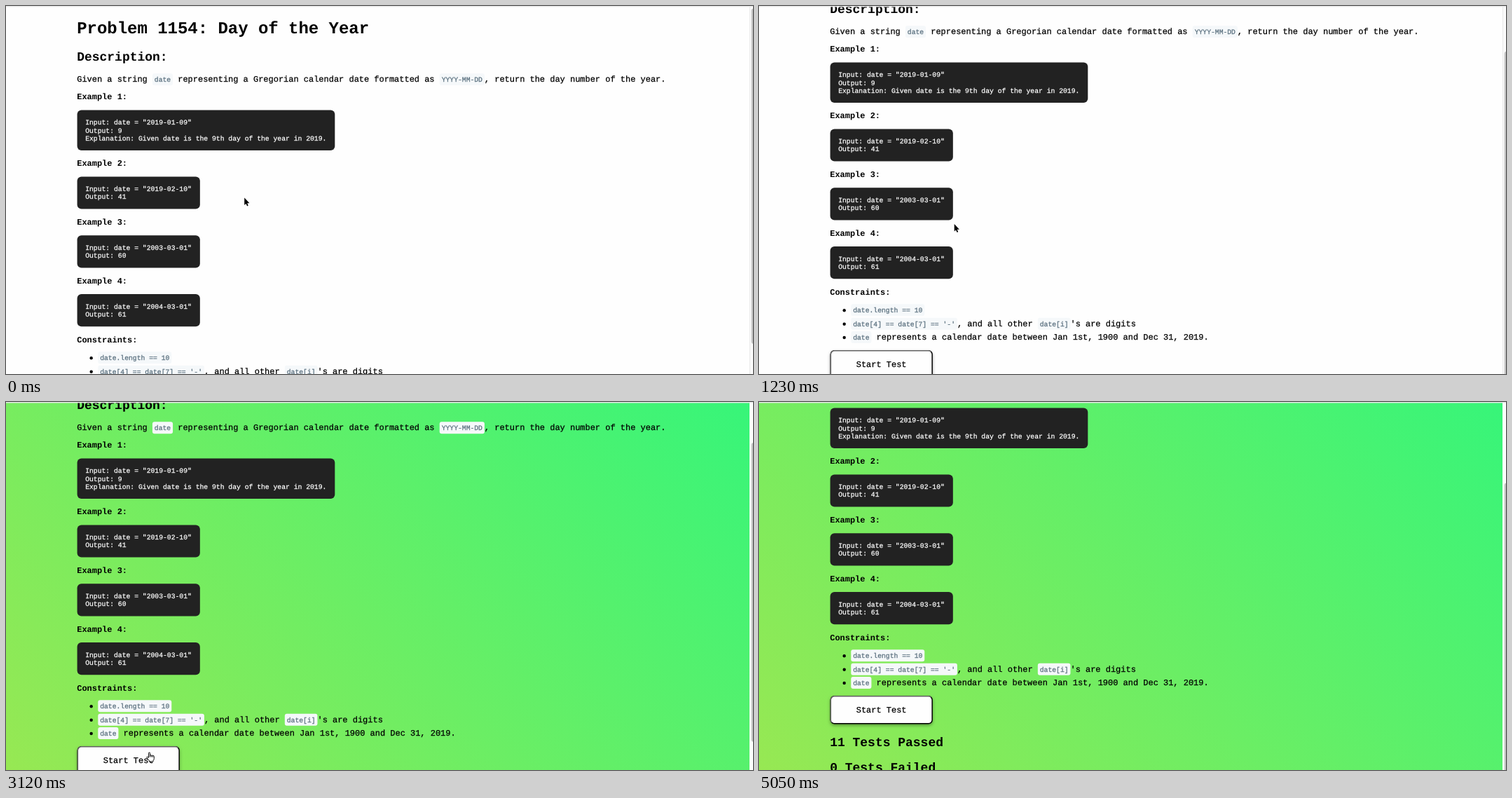
Write an HTML page with a canvas that moves like this. It is 1066 px wide and 525 px high and loops after 5.15 s.

```html
<!DOCTYPE html>
<html lang="en">
<head>
<meta charset="utf-8">
<title>Day of the Year</title>
<style>
  html, body { margin: 0; width: 100%; height: 100%; overflow: hidden; background: #fefefe; }
  canvas { display: block; }
</style>
</head>
<body>
<canvas id="stage" width="1066" height="525"></canvas>
<script>
const ctx = document.getElementById('stage').getContext('2d');
const W = 1066, H = 525, LOOP = 5150;
const LEFT = 101.2, BOX_LEFT = 101.6, PAGE_RIGHT = 1061, PASS_AT = 3120;
const ZOOM = 0.7488;
const BODY = 16 * ZOOM, CODE = 13 * ZOOM, H1 = 32 * ZOOM, H2 = 24 * ZOOM, PAD = 2.9;
const MONO = '"Liberation Mono", "Courier New", monospace';

// Held steps: [time, scroll offset]
const SCROLL = [
  [0, 0], [600, 8], [720, 19], [870, 28], [990, 39], [1110, 57], [1230, 68],
  [3210, 69], [3300, 72], [3420, 79], [3540, 86.8], [3630, 118], [3750, 140]
];

// Held steps: [time, shape, x, y]
const POINTER = [
  [0, 'arrow', 340.2, 273.5], [180, 'arrow', 279, 311.5], [330, 'arrow', 278.7, 311],
  [1740, 'arrow', 279, 352], [1840, 'arrow', 281, 445], [1950, 'beam', 286, 447],
  [2130, 'beam', 263, 449.5], [2220, 'beam', 259, 455], [2310, 'beam', 249, 465],
  [2390, 'arrow', 234, 477], [2480, 'hand', 219, 487], [2570, 'hand', 207, 494],
  [2660, 'hand', 203, 497], [2750, 'hand', 201, 499], [2840, 'hand', 200.5, 500],
  [3210, 'hand', 202, 499], [3300, 'hand', 207, 495], [3420, 'hand', 216, 489],
  [3540, 'hand', 222.8, 485], [4230, 'arrow', 345, 502], [4320, 'arrow', 490, 507],
  [4410, 'arrow', 690, 511], [4500, 'arrow', 900, 514], [4600, 'arrow', 1053, 517],
  [4690, 'arrow', 1029, 516], [4870, 'arrow', 1010, 516], [4960, 'arrow', 992, 519],
  [5050, 'none', 0, 0]
];

const SHAPES = {
  arrow: new Path2D('M0 0V10.6L2.3 8.4 3.9 12 5.5 11.3 4 7.8H7.2Z'),
  beam: new Path2D('M-3-6.3Q0-6.3 0-4.8V4.8Q0 6.3-3 6.3M3-6.3Q0-6.3 0-4.8M0 4.8Q0 6.3 3 6.3M-1.5 2.2H1.5'),
  hand: new Path2D('M3 7.5V1.2q0-1.2 1-1.2t1 1.2V4.6q.2-.9 1-.9t1 1.1q.2-.8 1-.8t1 1.1' +
    'q.2-.7.9-.7t.9 1.1V8.5q0 2-1.3 3.2V13H4V11.8Q2.2 10 .8 7.8 0 6.4 1 6.1 2 6 3 7.5Z')
};

const EXAMPLES = [
  { y: 148.5, lines: ['Input: date = "2019-01-09"', 'Output: 9',
    'Explanation: Given date is the 9th day of the year in 2019.'] },
  { y: 243.4, lines: ['Input: date = "2019-02-10"', 'Output: 41'] },
  { y: 327.2, lines: ['Input: date = "2003-03-01"', 'Output: 60'] },
  { y: 411, lines: ['Input: date = "2004-03-01"', 'Output: 61'] }
];

function held(steps, t) {
  let current = steps[0];
  for (const step of steps) if (step[0] <= t) current = step;
  return current;
}

function textWidth(str, size) {
  ctx.font = `${size}px ${MONO}`;
  return ctx.measureText(str).width;
}

function text(str, x, y, size = BODY, color = '#000', bold = false) {
  ctx.font = `${bold ? 'bold ' : ''}${size}px ${MONO}`;
  ctx.fillStyle = ctx.strokeStyle = color;
  ctx.fillText(str, x, y);
  if (!bold) {
    ctx.lineWidth = 0.25;
    ctx.strokeText(str, x, y);
  }
  return x + ctx.measureText(str).width;
}

const heading = (str, y, size = BODY) => text(str, LEFT, y, size, '#000', true);

function box(x, y, w, h, r, color) {
  ctx.beginPath();
  ctx.roundRect(x, y, w, h, r);
  ctx.fillStyle = color;
  ctx.fill();
}

// Mixed line: parts in backticks become code chips
function rich(str, x, y) {
  str.split('`').forEach((part, i) => {
    if (!part) return;
    if (i % 2 === 0) {
      x = text(part, x, y);
      return;
    }
    const w = textWidth(part, CODE) + PAD * 2;
    box(x, y - 12, w, 17, 3, '#f5f8fa');
    text(part, x + PAD, y, CODE, '#586e7d');
    x += w;
  });
}

function bullet(str, y) {
  ctx.beginPath();
  ctx.arc(121.7, y - 3, 2.2, 0, Math.PI * 2);
  ctx.fillStyle = '#000';
  ctx.fill();
  rich(str, 131.3, y);
}

function example({ y, lines }, i) {
  heading(`Example ${i + 1}:`, y - 15.2);
  const w = Math.max(...lines.map(s => textWidth(s, CODE))) + 23.6;
  box(BOX_LEFT, y, w, lines.length * 11.2 + 23.8, 6, '#222');
  lines.forEach((s, n) => text(s, LEFT + 12, y + 20.8 + n * 11.2, CODE, '#fff'));
}

function button(x, y, w, h) {
  ctx.save();
  ctx.shadowColor = 'rgba(0,0,0,.35)';
  ctx.shadowBlur = 4;
  ctx.shadowOffsetY = 2;
  box(x, y, w, h, 6, '#000');
  ctx.restore();
  // Outset border: lighter on the top and left
  ctx.save();
  ctx.beginPath();
  ctx.moveTo(x, y + h);
  ctx.lineTo(x, y);
  ctx.lineTo(x + w, y);
  ctx.lineTo(x + w - 6, y + 6);
  ctx.lineTo(x + 6, y + h - 6);
  ctx.clip();
  box(x, y, w, h, 6, '#626262');
  ctx.restore();
  box(x + 1.5, y + 1.5, w - 3, h - 3, 4.5, '#fefefe');
  text('Start Test', x + 37.1, y + 24);
}

function background(passed) {
  ctx.fillStyle = '#fefefe';
  ctx.fillRect(0, 0, W, H);
  if (!passed) return;
  const cx = PAGE_RIGHT / 2, cy = H / 2, d = (PAGE_RIGHT + H) / 4;
  const g = ctx.createLinearGradient(cx - d, cy + d, cx + d, cy - d);
  g.addColorStop(0, '#97e853');
  g.addColorStop(1, '#37f579');
  ctx.fillStyle = g;
  ctx.fillRect(0, 0, PAGE_RIGHT, H);
}

function page(passed) {
  heading('Problem 1154: Day of the Year', 39, H1);
  heading('Description:', 78, H2);
  rich('Given a string `date` representing a Gregorian calendar date formatted as ' +
    '`YYYY-MM-DD`, return the day number of the year.', LEFT, 108.2);
  EXAMPLES.forEach(example);
  heading('Constraints:', 479.6);
  bullet('`date.length == 10`', 505.3);
  bullet("`date[4] == date[7] == '-'`, and all other `date[i]`'s are digits", 524.7);
  bullet('`date` represents a calendar date between Jan 1st, 1900 and Dec 31, 2019.', 544);
  button(BOX_LEFT, 559.1, 146.3, 40.4);
  if (passed) {
    heading('11 Tests Passed', 631, H2);
    heading('0 Tests Failed', 667, H2);
  }
}

function frameEdges(scroll, passed) {
  ctx.fillStyle = passed ? '#fefefe' : '#fbfbfb';
  ctx.fillRect(PAGE_RIGHT, 0, W - PAGE_RIGHT, H);
  ctx.fillStyle = '#e8e8e8';
  if (!passed) ctx.fillRect(PAGE_RIGHT, 0, 1, H);
  ctx.fillRect(0, 0, W, 1.4);
  const top = 3.5 + scroll * (passed ? 0.8 : 0.9);
  box(1063.7, top, 6, passed ? 427 : 478.5, 3, '#c1c1c1');
}

function pointer([, shape, x, y]) {
  if (shape === 'none') return;
  const path = SHAPES[shape];
  ctx.save();
  ctx.translate(x, y);
  ctx.lineJoin = 'round';
  if (shape === 'hand') {
    ctx.fillStyle = '#fff';
    ctx.fill(path);
    ctx.strokeStyle = '#000';
    ctx.lineWidth = 1;
    ctx.stroke(path);
    ctx.stroke(new Path2D('M5 4.6V6.5M7 4.8V6.6M9 5.1V6.7'));
  } else {
    ctx.strokeStyle = '#fff';
    ctx.lineWidth = shape === 'beam' ? 2.4 : 1.5;
    ctx.stroke(path);
    ctx.strokeStyle = ctx.fillStyle = '#000';
    ctx.lineWidth = 1;
    if (shape === 'beam') ctx.stroke(path);
    else ctx.fill(path);
  }
  ctx.restore();
}

function draw(now) {
  const t = now % LOOP;
  const scroll = held(SCROLL, t)[1];
  const passed = t >= PASS_AT;
  ctx.textRendering = 'geometricPrecision';
  background(passed);
  ctx.save();
  ctx.translate(0, -scroll);
  page(passed);
  ctx.restore();
  frameEdges(scroll, passed);
  pointer(held(POINTER, t));
}

let start;
function tick(now) {
  start ??= now;
  draw(now - start);
  requestAnimationFrame(tick);
}
requestAnimationFrame(tick);
</script>
</body>
</html>
```
